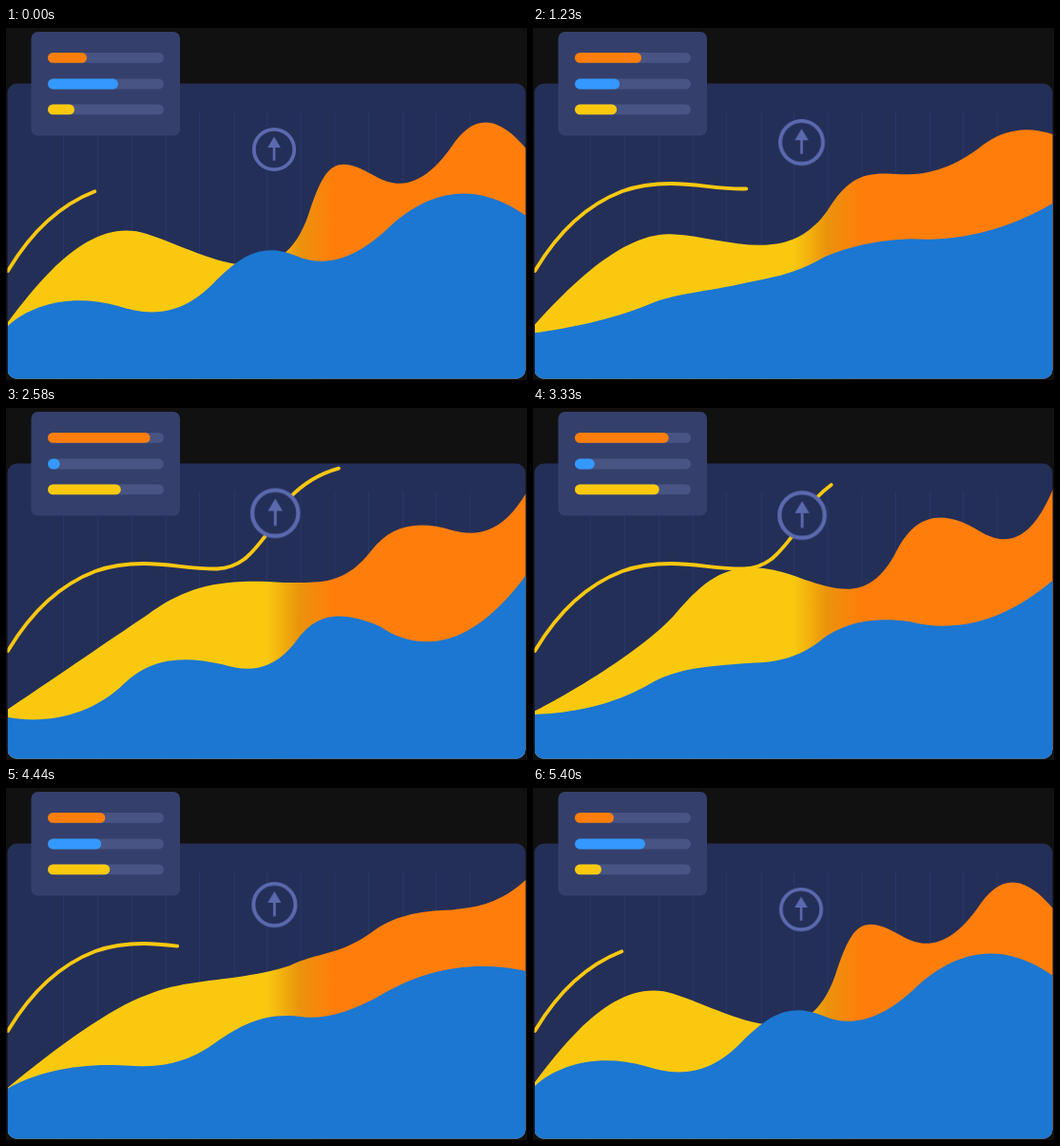
An HTML page that plays this animation: 548x371 px, repeating every 5430 ms.

```html
<!DOCTYPE html>
<html lang="en">
<head>
<meta charset="utf-8">
<title>Rising chart</title>
<style>
html, body { margin: 0; width: 100%; height: 100%; overflow: hidden; background: #111; }
svg { display: block; width: 548px; height: 371px; }

/* Every part eases to its peak and back, then rests for the last 30 ms. */
.move { animation: 5430ms cubic-bezier(.3333, 0, .6667, 1) infinite; }

.panel { fill: #242f58; }
.card { fill: #34406b; }
.track { fill: #485483; }
.grid { stroke: #25376a; stroke-width: 1; }

.trend { fill: none; stroke: #fac80f; stroke-width: 3.8; stroke-linecap: round; animation-name: trend; }
@keyframes trend {
  0%, 99.448%, 100% { stroke-dasharray: 126.5 900; }
  49.724% { stroke-dasharray: 431.6 900; }
}

.badge { fill: #242f58; stroke: #5b69ae; animation-name: badge; }
@keyframes badge {
  0%, 99.448%, 100% { transform: translate(282px, 128px) scale(1); }
  49.724% { transform: translate(283.2px, 110.7px) scale(1.14); }
}

.orange { fill: #ff7e0b; animation-name: orange; }
.blue { fill: #3598fd; animation-name: blue; }
.yellow { fill: #fac90f; animation-name: yellow; }
@keyframes orange {
  0%, 99.448%, 100% { width: 41px; }
  49.724% { width: 108px; }
}
@keyframes blue {
  0%, 99.448%, 100% { width: 74px; }
  49.724% { width: 12.3px; }
}
@keyframes yellow {
  0%, 99.448%, 100% { width: 28px; }
  68.14% { width: 90.5px; }
}

.back { fill: url(#warm); animation-name: back; }
@keyframes back {
  0%, 99.448%, 100% {
    d: path("M2 310 C45 252 94 199.5 148 217 C208 236 286 290 318 197 C336 142 346 132 388 156 C412 170 438 168 468 126 C488 95 513 86 547 127 L560 380 L2 380 Z");
  }
  68.14% {
    d: path("M2 319.5 C45 299 118 254 148 219 C184 174 211 148 285 180.5 C323 194.5 356 206 383 149 C402 112 429 103 470 130 C497 147 526 147 552 71 L560 380 L2 380 Z");
  }
}

.front { fill: #1b77d2; animation-name: front; }
@keyframes front {
  0%, 99.448%, 100% {
    d: path("M2 314 C28 290 72 280 118 293 C146 302 183 308 222 265 C247 241 269 225 305 240 C330 251 362 249 403 210 C442 174 490 158 547 198 L547 380 L2 380 Z");
  }
  40.516% {
    d: path("M2 326.5 C42 335 90 327 125 290 C150 264 182 257.5 228 270.5 C253 279 281 283 308 242 C323 222 343 207 393 231 C432 260 487 262 547 175 L547 380 L2 380 Z");
  }
}
</style>
</head>
<body>
<svg viewBox="0 0 548 371">
  <defs>
    <clipPath id="frame"><rect x="1.5" y="58.5" width="545" height="311.3" rx="10"/></clipPath>
    <linearGradient id="warm" gradientUnits="userSpaceOnUse" x1="274" x2="344" y1="0" y2="0">
      <stop offset="0" stop-color="#fac90f"/>
      <stop offset=".5" stop-color="#ea930b"/>
      <stop offset="1" stop-color="#ff7e0b"/>
    </linearGradient>
  </defs>

  <g clip-path="url(#frame)">
    <rect class="panel" width="548" height="371"/>
    <path class="grid" d="M60.5 88V371M96.5 88V371M132.5 88V371M168.5 88V371M203.5 88V371M240.5 88V371M274.5 88V371M310 88V371M346 88V371M381.5 88V371M417.5 88V371M452.5 88V371M488 88V371"/>
    <path class="move back"/>
    <path class="move front"/>
    <path class="move trend" pathLength="432" d="M2 256C18 229 47 190 94 172C108 167 124 164 145 164C172 164 196 170 222 169.5C248 168.5 259 152 272 136C283 120 287 106 298 95C312 80 329 69 352 63"/>
    <g class="move badge">
      <circle r="21.2" stroke-width="3.8"/>
      <path d="M0 -4V11.7" stroke-width="2.6"/>
      <path d="M0 -13.5L6.8 -2H-6.8Z" fill="#5b69ae" stroke="none"/>
    </g>
  </g>

  <rect class="card" x="26.5" y="4" width="156.5" height="109.5" rx="7"/>
  <g class="track">
    <rect x="44" y="26" width="122" height="10.8" rx="5.4"/>
    <rect x="44" y="53.6" width="122" height="10.8" rx="5.4"/>
    <rect x="44" y="80.5" width="122" height="10.8" rx="5.4"/>
  </g>
  <rect class="move orange" x="44" y="26" height="10.8" rx="5.4"/>
  <rect class="move blue" x="44" y="53.6" height="10.8" rx="5.4"/>
  <rect class="move yellow" x="44" y="80.5" height="10.8" rx="5.4"/>
</svg>
</body>
</html>
```
